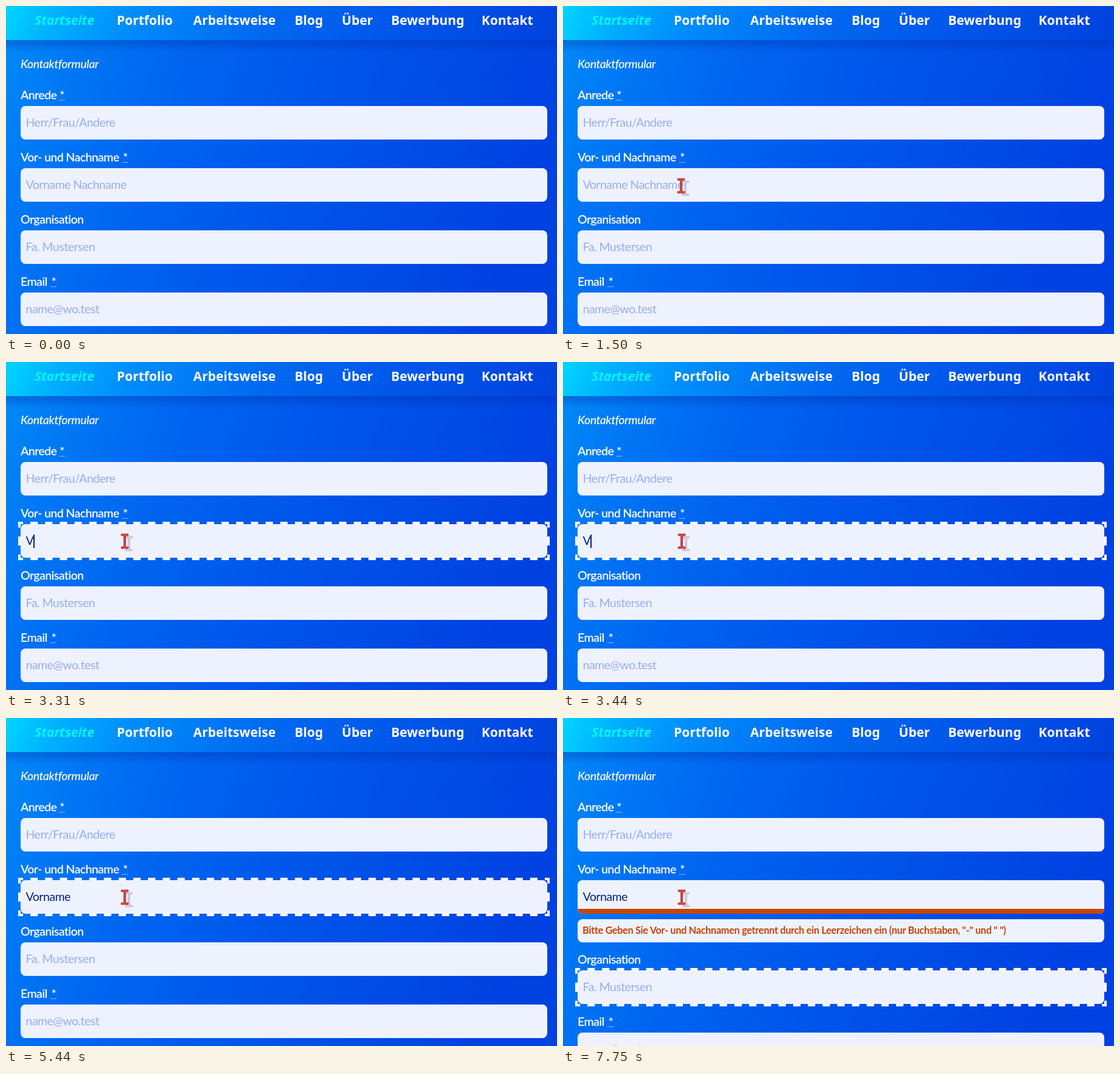
Animation of 905x538 px, one loop 8 s. Source, as an HTML page:

```html
<!DOCTYPE html>
<html lang="de">
<head>
<meta charset="utf-8">
<title>Kontaktformular</title>
<style>
html, body { margin: 0; width: 100%; height: 100%; overflow: hidden; background: #0058ea; }
svg { display: block; width: 905px; height: 538px; }
text { font: 400 19.5px Lato, "Open Sans", sans-serif; letter-spacing: -.5px; white-space: pre; }
.nav text { font: 700 21px "Noto Sans", "Open Sans", sans-serif; letter-spacing: 0; fill: #fff; }
.nav .active { font-style: italic; fill: #00f6ff; }
.title { font-style: italic; font-weight: 500; letter-spacing: -.45px; fill: #fff; }
.label { font-weight: 600; letter-spacing: -.6px; fill: #fff; }
.hint { fill: #94aef2; }
.typed { fill: #00237c; }
.error text { font-size: 16.2px; font-weight: 700; letter-spacing: -.29px; fill: #c64300; }
.box { fill: #eef2ff; }
</style>
</head>
<body>
<svg viewBox="0 0 905 538" xmlns="http://www.w3.org/2000/svg">
  <defs>
    <linearGradient id="page" gradientUnits="userSpaceOnUse" x1="0" y1="56" x2="850" y2="360">
      <stop offset="0" stop-color="#0089f8"/>
      <stop offset=".12" stop-color="#0078f5"/>
      <stop offset=".32" stop-color="#0064f0"/>
      <stop offset=".6" stop-color="#0054ea"/>
      <stop offset="1" stop-color="#0041e1"/>
    </linearGradient>
    <linearGradient id="bar" gradientUnits="userSpaceOnUse" x1="0" y1="0" x2="760" y2="330">
      <stop offset="0" stop-color="#00d6ff"/>
      <stop offset=".1" stop-color="#00b0ff"/>
      <stop offset=".24" stop-color="#008cfb"/>
      <stop offset=".5" stop-color="#0067f0"/>
      <stop offset="1" stop-color="#0044e0"/>
    </linearGradient>
    <linearGradient id="shade" x1="0" y1="0" x2="0" y2="1">
      <stop offset="0" stop-color="#002aa0" stop-opacity=".34"/>
      <stop offset="1" stop-color="#002aa0" stop-opacity="0"/>
    </linearGradient>
    <clipPath id="nameClip"><rect x="24" y="266" width="865" height="55" rx="8"/></clipPath>
    <path id="beam" d="M-4.5-10.5H-2Q0-10.5 0-8.5Q0-10.5 2-10.5H4.5M0-9V9M-4.5 10.5H-2Q0 10.5 0 8.5Q0 10.5 2 10.5H4.5"
      fill="none" stroke-linecap="round" stroke-linejoin="round"/>
  </defs>

  <rect width="905" height="538" fill="url(#page)"/>
  <rect y="56" width="905" height="20" fill="url(#shade)"/>
  <rect width="905" height="56" fill="url(#bar)"/>
  <g class="nav" id="nav"></g>
  <text class="title" x="24" y="102">Kontaktformular</text>

  <g id="upper"></g>
  <text class="typed" id="typed" x="32.5" y="300"></text>
  <g class="error" id="error">
    <rect x="24" y="313" width="865" height="8" fill="#c84700" clip-path="url(#nameClip)"/>
    <rect class="box" x="24" y="330" width="865" height="38" rx="8"/>
    <text x="32" y="354">Bitte Geben Sie Vor- und Nachnamen getrennt durch ein Leerzeichen ein (nur Buchstaben, "-" und " ")</text>
  </g>
  <g id="lower"></g>

  <g id="focus" fill="none" stroke="#fff" stroke-width="4"></g>
  <rect id="caret" width="2" height="22" fill="#00237c"/>
  <g id="cursor">
    <use href="#beam" x="7" y="4" stroke="#c9bccb" stroke-width="4" opacity=".8"/>
    <use href="#beam" stroke="#8f3038" stroke-width="4"/>
    <use href="#beam" stroke="#e2483f" stroke-width="2.4"/>
  </g>
</svg>
<script>
const LOOP = 8000, SHIFT = 46;
const $ = id => document.getElementById(id);

function add(parent, tag, attrs, text) {
  const el = document.createElementNS('http://www.w3.org/2000/svg', tag);
  for (const k in attrs) el.setAttribute(k, attrs[k]);
  if (text) el.textContent = text;
  parent.appendChild(el);
  return el;
}

function show(el, on) {
  el.setAttribute('visibility', on ? 'visible' : 'hidden');
}

// y is the top of the input; star is the x of the required mark
function field(parent, y, label, hint, star) {
  add(parent, 'text', { class: 'label', x: 24, y: y - 11 }, label);
  if (star) {
    add(parent, 'text', { class: 'label', x: star, y: y - 11 }, '*');
    add(parent, 'path', {
      d: `M${star - 1} ${y - 9.5}h9`, stroke: '#fff', 'stroke-dasharray': '1 1'
    });
  }
  add(parent, 'rect', { class: 'box', x: 24, y, width: 865, height: 55, rx: 8 });
  return add(parent, 'text', { class: 'hint', x: 32.5, y: y + 34 }, hint);
}

// One dashed side that starts and ends with half a dash
function dashedSide(x1, y1, x2, y2) {
  const len = Math.hypot(x2 - x1, y2 - y1);
  const dash = len / Math.round(len / 24) / 2;
  add($('focus'), 'line', {
    x1, y1, x2, y2, 'stroke-dasharray': dash, 'stroke-dashoffset': dash / 2
  });
}

[['Startseite', 47], ['Portfolio', 182], ['Arbeitsweise', 307.5], ['Blog', 474],
 ['Über', 551.5], ['Bewerbung', 632.5], ['Kontakt', 781]].forEach(([name, x], i) =>
  add($('nav'), 'text', { x, y: 31, class: i ? '' : 'active' }, name));

field($('upper'), 164, 'Anrede', 'Herr/Frau/Andere', 88);
const nameHint = field($('upper'), 266, 'Vor- und Nachname', 'Vorname Nachname', 192);
field($('lower'), 368, 'Organisation', 'Fa. Mustersen');
field($('lower'), 470, 'Email', 'name@wo.test', 74.5);

dashedSide(22, 264, 891, 264);
dashedSide(22, 323, 891, 323);
dashedSide(22, 264, 22, 323);
dashedSide(891, 264, 891, 323);
add($('focus'), 'path', { d: 'M20 264h4M889 264h4M20 323h4M889 323h4' });

const WORD = 'Vorname';
const KEYS = [3310, 3750, 3880, 4190, 4440, 4560, 4810];
const FOCUS = 1810, CARET = 1880, BLINK = 5440, TAB = 6560, HIDE = 7750;

// Progress from 0 to 1 in a number of equal hops
function hops(t, from, to, n) {
  const k = Math.floor((t - from) / (to - from) * (n - 1) + 1e-6) + 1;
  return Math.max(0, Math.min(n, k)) / n;
}

function cursorAt(t) {
  if (t < 1250) {
    const p = hops(t, 380, 1130, 9);
    return [38 + 144 * p, 268 * p];
  }
  if (t >= 2130) return [195, 294];
  const p = hops(t, 1250, 1500, 4);
  return [182 + 12 * p, 268 + 27 * p];
}

function draw(t) {
  const failed = t >= TAB;
  const count = KEYS.filter(k => t >= k).length;
  $('typed').textContent = WORD.slice(0, count);
  show(nameHint, count === 0);
  show($('error'), failed);
  $('lower').setAttribute('transform', `translate(0 ${failed ? SHIFT : 0})`);

  show($('focus'), t >= FOCUS);
  $('focus').setAttribute('transform', `translate(0 ${failed ? 148 : 0})`);

  const width = count && !failed ? $('typed').getComputedTextLength() : 0;
  $('caret').setAttribute('x', Math.round(32 + width));
  $('caret').setAttribute('y', failed ? 431 : 283);
  show($('caret'), t >= CARET && t < BLINK || failed && t < HIDE);

  const [x, y] = cursorAt(t);
  $('cursor').setAttribute('transform', `translate(${x} ${y})`);
  show($('cursor'), t >= 380);
}

let start;
function tick(now) {
  if (start === undefined) start = now;
  draw((now - start) % LOOP);
  requestAnimationFrame(tick);
}
draw(0);
requestAnimationFrame(tick);
</script>
</body>
</html>
```
